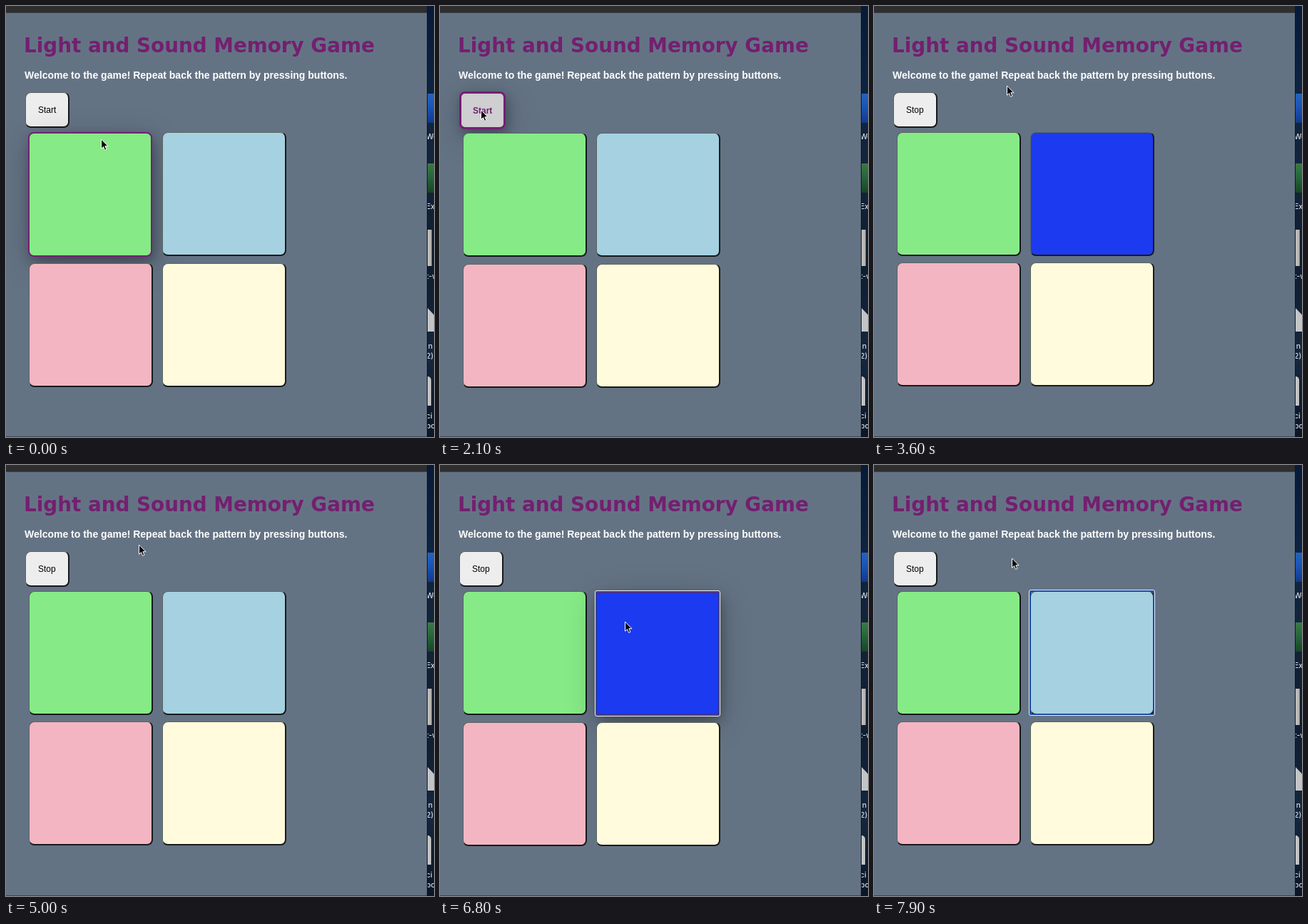
An HTML page for the animation above (8000 ms loop, 600 by 605 pixels).

```html
<!DOCTYPE html>
<html lang="en">
<head>
<meta charset="utf-8">
<title>Memory Game</title>
<style>
  html, body { margin: 0; width: 100%; height: 100%; overflow: hidden; background: #647384; }
  #stage { position: relative; width: 600px; height: 605px; overflow: hidden; background: #647384; }
  :where(#stage *) { position: absolute; box-sizing: border-box; white-space: nowrap; }

  .bar { left: 0; top: 0; width: 590px; height: 10px; background: #2e2e2e; border-bottom: 1px solid #3d444b; }
  .foot { left: 0; top: 604px; width: 590px; height: 1px; background: #3b444e; }
  h1 { left: 25px; top: 36px; margin: 0; font: bold 27.8px/40px "DejaVu Sans", sans-serif; color: #741f70; }
  p { left: 26px; top: 87px; margin: 0; font: bold 14px/20px "Liberation Sans", sans-serif; color: #fff; }

  .key { border: solid #161a1c; border-width: 1px 2px 2px 1px; border-top-color: #59645f; border-left-color: #59645f; }
  .key.hover {
    border-color: #741f74;
    box-shadow: 3px 7px 16px rgba(0, 0, 0, .26), 1px 10px 46px rgba(0, 0, 0, .22);
  }
  #toggle {
    left: 27px; top: 121px; height: 50px; padding: 0 17px; border-radius: 8px;
    display: flex; align-items: center; background: #eeedee; color: #000;
    font: 12px/14px "Liberation Sans", sans-serif;
  }
  #toggle.hover {
    top: 120px; height: 53px; padding: 0 16px; border-width: 3px;
    background: #cfced0; color: #741f74; font-weight: bold;
  }
  .pad { width: 174px; height: 174px; border-radius: 8px; background: var(--color); }
  .pad.hover { margin-left: -1px; height: 175px; border-width: 2px; }
  .pad.lit { background: var(--bright); }
  .pad.focus::after {
    content: ""; position: absolute; inset: -3px; box-sizing: border-box;
    border: 1px solid #e9eff8; border-radius: 3px; box-shadow: inset 0 0 0 2px #1d4ba3;
  }
  .pad.focus.hover { border-width: 3px; }
  .pad.focus.hover::after { inset: -4px; box-shadow: inset 0 0 0 2px #2646b0; }

  #desk {
    left: 590px; top: 0; width: 10px; height: 605px; overflow: hidden;
    background: linear-gradient(#071a38, #0d2340 18%, #14253b 36%, #0f1d30 60%, #15273d 82%, #0b1626);
    border-left: 1px solid #101823;
  }
  #desk i { left: 0; width: 10px; }
  #desk span { left: -2px; font: 500 10.5px/14px Inter, sans-serif; color: #d9dde2; }
  #cursor { left: 0; top: 0; overflow: visible; }
</style>
</head>
<body>
<div id="stage">
  <div class="bar"></div>
  <div class="foot"></div>
  <h1>Light and Sound Memory Game</h1>
  <p>Welcome to the game! Repeat back the pattern by pressing buttons.</p>
  <div id="toggle" class="key">Start</div>
  <div class="key pad" style="--color:#86ea86; --bright:#008000"></div>
  <div class="key pad" style="--color:#a5d1e1; --bright:#1c3af0"></div>
  <div class="key pad" style="--color:#f3b5c1; --bright:#ff1493"></div>
  <div class="key pad" style="--color:#fffbdc; --bright:#ffff00"></div>
  <div id="desk">
    <i style="top:123px; height:41px; background:linear-gradient(#2463bd, #1a54b8 45%, #12398a)"></i>
    <span style="top:177px">We</span>
    <i style="top:221px; height:41px; background:linear-gradient(#3a7a45, #27663a 45%, #174426)"></i>
    <span style="top:275px">Ex</span>
    <i style="top:314px; height:51px; width:6px; background:linear-gradient(90deg, #bdbab6 70%, #808080)"></i>
    <span style="top:373px">t-w</span>
    <i style="top:424px; height:33px; background:#c3c4c6; clip-path:polygon(0 0, 100% 32%, 100% 100%, 0 100%)"></i>
    <span style="top:471px">in</span>
    <span style="top:485px">2)</span>
    <i style="top:520px; height:41px; width:5px; background:#c3c3c3; border-radius:0 5px 0 0"></i>
    <span style="top:569px">ci</span>
    <span style="top:583px">po</span>
  </div>
  <svg id="cursor" width="12" height="18">
    <path d="M.5 0V13.2L3.5 10.5L5.6 15.4L7.9 14.4L5.8 9.7H10Z" fill="#000" stroke="#fff" stroke-linejoin="round"/>
  </svg>
</div>
<script>
  const LOOP = 8000;
  const START_CLICK = 2300;
  const CLUE = [3300, 4300];
  const PRESS = [6600, 6850];

  // Pointer stops: time, x, y
  const path = [
    [0, 133, 187], [150, 133, 187], [900, 57, 147], [2400, 57, 146],
    [3000, 186, 112], [5200, 186, 112], [5800, 254, 204], [6200, 256, 206],
    [6700, 259, 220], [7250, 259, 220], [7750, 193, 131], [LOOP, 193, 131]
  ];

  const toggle = document.getElementById('toggle');
  const cursor = document.getElementById('cursor');
  const pads = [...document.querySelectorAll('.pad')];

  const during = (t, [from, to]) => t >= from && t < to;
  const inside = (p, x, y, w, h) => p.x >= x && p.x < x + w && p.y >= y && p.y < y + h;

  function pointerAt(t) {
    const i = path.findIndex(stop => stop[0] > t);
    const [t0, x0, y0] = path[i - 1];
    const [t1, x1, y1] = path[i];
    const k = (t - t0) / (t1 - t0);
    const e = k * k * (3 - 2 * k);
    return { x: x0 + (x1 - x0) * e, y: y0 + (y1 - y0) * e };
  }

  function draw(t) {
    const p = pointerAt(t);
    const onToggle = inside(p, 27, 121, 62, 50);
    const hovered = pads.findIndex((_, i) => inside(p, 32 + i % 2 * 187, 177 + (i >> 1) * 183, 174, 174));

    toggle.textContent = t < START_CLICK ? 'Start' : 'Stop';
    toggle.classList.toggle('hover', onToggle);

    // A thicker hover border pushes the rows below it down
    const top = onToggle ? 178 : 177;
    const rowTops = [top, top + (onToggle || hovered >= 0 ? 184 : 183)];

    pads.forEach((pad, i) => {
      pad.style.left = 32 + i % 2 * 187 + 'px';
      pad.style.top = rowTops[i >> 1] + 'px';
      pad.classList.toggle('hover', i === hovered);
      pad.classList.toggle('lit', i === 1 && (during(t, CLUE) || during(t, PRESS)));
      pad.classList.toggle('focus', i === 1 && t >= PRESS[0]);
    });
    cursor.style.transform = `translate(${p.x}px, ${p.y}px)`;
  }

  const begin = performance.now();
  function tick() {
    draw((performance.now() - begin) % LOOP);
    requestAnimationFrame(tick);
  }
  tick();
</script>
</body>
</html>
```
